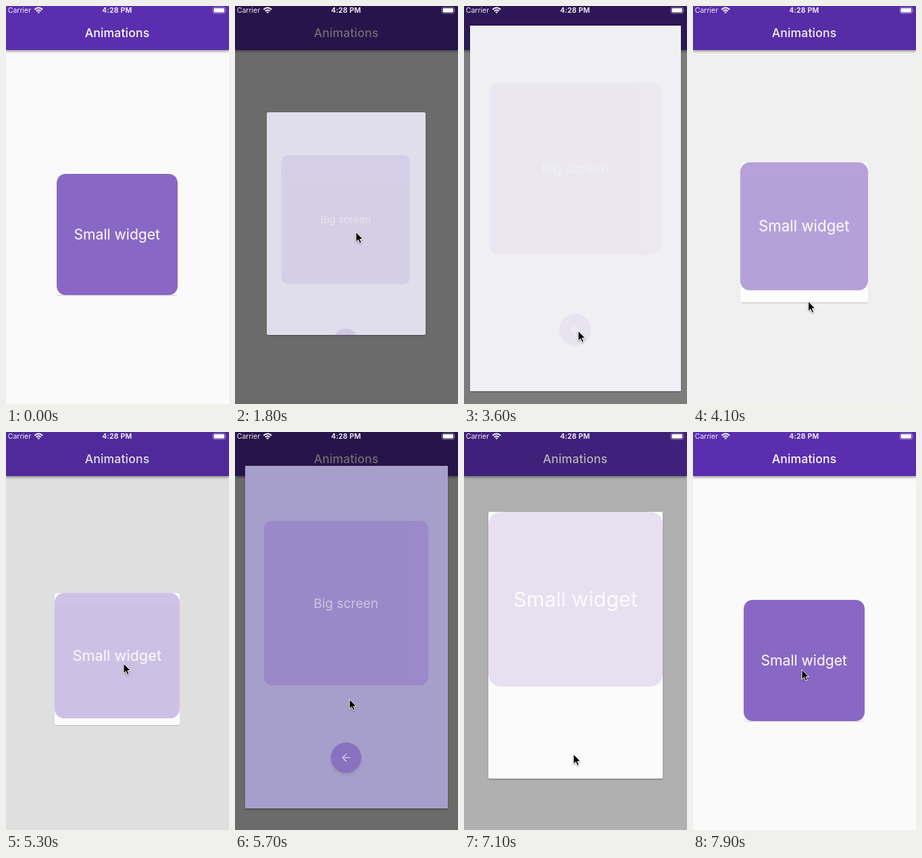
Write an HTML page that moves like this. It is 330x588 px and loops after 8 s.

```html
<!DOCTYPE html>
<html lang="en">
<head>
<meta charset="utf-8">
<title>Container transform</title>
<style>
  html, body { margin: 0; width: 100%; height: 100%; overflow: hidden; background: #fafafa; }
  #stage { position: relative; width: 330px; height: 588px; overflow: hidden; background: #fafafa; }
  #stage > *, #box > * { position: absolute; left: 0; top: 0; }
  svg { display: block; overflow: visible; }
  #bar { width: 330px; height: 65px; background: #5a2eae; box-shadow: 0 2px 3px rgba(0,0,0,.3), 0 1px 6px rgba(0,0,0,.16); }
  #scrim { width: 330px; height: 588px; background: #000; }
  #box { overflow: hidden; }
  #small, #big { transform-origin: 0 0; }
  #fab { filter: drop-shadow(0 3px 3px rgba(0,0,0,.3)); }
  #cursor { filter: drop-shadow(0 1px 1px rgba(0,0,0,.35)); }
  text { font-family: Inter, Roboto, sans-serif; fill: #fff; }
  .label { font-size: 21.1px; text-anchor: middle; }
  .title { font-size: 17.6px; font-weight: 500; letter-spacing: .13px; text-anchor: middle; }
  .status { font-size: 10.56px; }
</style>
</head>
<body>
<div id="stage">
  <div id="bar">
    <svg width="330" height="65"><text class="title" x="164.5" y="46.3">Animations</text></svg>
  </div>
  <div id="scrim"></div>
  <div id="box">
    <svg id="big" width="330" height="588">
      <rect x="30.5" y="89.5" width="268" height="267.5" rx="13.2" fill="#8968c5"/>
      <text class="label" x="164.2" y="230.8">Big screen</text>
      <g id="fab"><circle cx="164.5" cy="474.5" r="24.7" fill="#5a2eab"/></g>
      <path transform="translate(154 464) scale(.88)" fill="#fff"
        d="M20 11H7.83l5.59-5.59L12 4l-8 8 8 8 1.41-1.41L7.83 13H20z"/>
    </svg>
    <svg id="small" width="179" height="179">
      <rect width="179" height="179" rx="13.2" fill="#8968c5"/>
      <text class="label" x="89.3" y="97">Small widget</text>
    </svg>
  </div>
  <svg width="330" height="14">
    <text class="status" x="2.7" y="10" fill-opacity=".92">Carrier</text>
    <text class="status" x="164.4" y="10" text-anchor="middle" font-weight="600" letter-spacing=".2">4:28 PM</text>
    <g fill="none" stroke="#fff" stroke-width="1.9">
      <path d="M42.3 5.2Q48.2 -.3 54.1 5.2"/>
      <path d="M44.7 7.6Q48.2 4.4 51.7 7.6"/>
    </g>
    <path d="M46.2 9Q48.2 7.4 50.2 9L48.2 11z" fill="#fff"/>
    <rect x="306" y="1.9" width="18.6" height="9" rx="2.6" fill="none" stroke="#fff" stroke-opacity=".45" stroke-width=".9"/>
    <rect x="307.5" y="3.3" width="15.6" height="6.2" rx="1.4" fill="#fff"/>
    <path d="M325.6 4.9Q327 6.4 325.6 7.9z" fill="#fff" fill-opacity=".5"/>
  </svg>
  <svg id="cursor" width="12" height="19">
    <path d="M0 0V14.6L3.4 11.4L5.7 16.8L8.1 15.8L5.9 10.5H10.4Z" fill="#000" stroke="#fff" stroke-width="1"/>
  </svg>
</div>
<script>
const LOOP = 8000, STEP = 100, DURATION = 1000;
const CLOSED = { x: 75, y: 248, w: 179, h: 179 };
const OPEN = { x: 0, y: 0, w: 330, h: 588 };
const WHITE = [255, 255, 255], CANVAS = [250, 250, 250], INDIGO = [42, 22, 133];

const phases = [
  { start: -DURATION, opening: false },
  { start: 1500, visible: 1700, opening: true },
  { start: 3410, opening: false },
  { start: 5180, opening: true },
  { start: 6760, opening: false }
];

// Time, x, y of the pointer tip; it rests between equal positions.
const pointer = [
  [200, 244, 417], [1000, 179, 334], [2600, 179, 334], [3200, 169, 480],
  [3800, 169, 480], [4600, 174, 342], [5400, 174, 342], [6100, 162, 476],
  [7100, 162, 476], [7900, 161, 351]
];

const $ = id => document.getElementById(id);
const box = $('box'), big = $('big'), small = $('small'), scrim = $('scrim'), cursor = $('cursor');
const clamp = v => Math.min(1, Math.max(0, v));
const mix = (a, b, t) => a + (b - a) * t;
const mixColor = (a, b, t) => `rgb(${a.map((v, i) => Math.round(mix(v, b[i], t)))})`;
const smooth = t => t * t * (3 - 2 * t);

// cubic-bezier(.4, 0, .2, 1)
function fastOutSlowIn(x) {
  let lo = 0, hi = 1;
  for (let i = 0; i < 24; i++) {
    const s = (lo + hi) / 2, r = 1 - s;
    if (1.2 * s * r * r + .6 * s * s * r + s ** 3 < x) lo = s; else hi = s;
  }
  return smooth(lo);
}

function drawContainer(time) {
  const { start, opening } = phases.findLast(p => (p.visible ?? p.start) <= time);
  const k = clamp((time - start) / DURATION);
  const eased = k === 1 ? 1 : fastOutSlowIn(k);
  const p = opening ? eased : 1 - eased;
  const leaving = clamp(1 - k / .2), entering = clamp((k - .2) / .8);
  const [from, to] = opening ? [WHITE, INDIGO] : [INDIGO, WHITE];
  const [x, y, w, h] = ['x', 'y', 'w', 'h'].map(key => mix(CLOSED[key], OPEN[key], p));
  const lift = mix(1, 3, p);

  Object.assign(box.style, {
    left: x + 'px', top: y + 'px', width: w + 'px', height: h + 'px',
    borderRadius: mix(3.5, 0, p) + 'px',
    background: k < .2 ? mixColor(from, CANVAS, 1 - leaving) : mixColor(CANVAS, to, entering),
    boxShadow: `0 ${lift}px ${lift}px -.5px rgba(0,0,0,.2), 0 .5px ${lift}px rgba(0,0,0,.12)`
  });
  big.style.opacity = opening ? entering : leaving;
  small.style.opacity = opening ? leaving : entering;
  big.style.transform = `scale(${w / OPEN.w})`;
  small.style.transform = `scale(${w / CLOSED.w})`;
  scrim.style.opacity = .57 * (opening ? clamp(p / .2) : p);
}

function drawPointer(time) {
  cursor.style.visibility = time < pointer[0][0] ? 'hidden' : 'visible';
  const next = pointer.findIndex(p => p[0] > time);
  const b = next < 0 ? pointer.at(-1) : pointer[next];
  const a = next < 1 ? b : pointer[next - 1];
  const t = a === b ? 1 : smooth((time - a[0]) / (b[0] - a[0]));
  cursor.style.transform = `translate(${mix(a[1], b[1], t)}px, ${mix(a[2], b[2], t)}px)`;
}

const origin = performance.now();
function frame(now) {
  const elapsed = Math.max(0, now - origin) % LOOP;
  const time = Math.floor(elapsed / STEP) * STEP;
  drawContainer(time);
  drawPointer(time);
  requestAnimationFrame(frame);
}
frame(origin);
</script>
</body>
</html>
```
